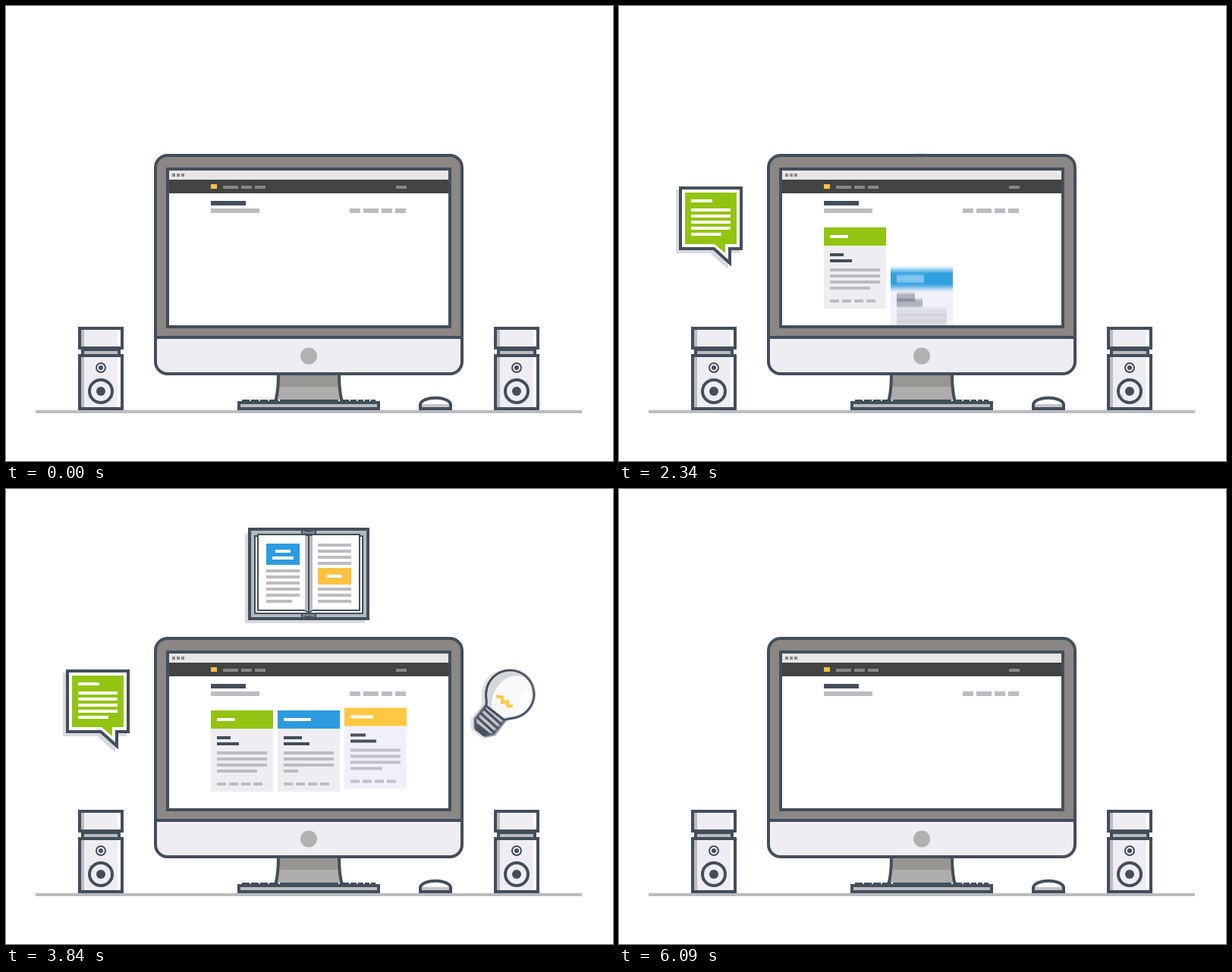
Recreate the animation shown at these times as an HTML page with a canvas. Size 800 px wide and 600 px high, loop 6.3 s.

```html
<!DOCTYPE html>
<html>
<head>
<meta charset="utf-8">
<style>
html, body { margin: 0; width: 100%; height: 100%; overflow: hidden; background: #fff; }
canvas { display: block; }
</style>
</head>
<body>
<canvas id="stage" width="800" height="600"></canvas>
<script>
const LOOP = 6300, STEP = 30;
const DARK = '#434e5b', GREY = '#bbbcc1', IVORY = '#eeedf2', FRAME = '#8a8785', WHITE = '#fff',
      SHADOW = '#d9dae0', GREEN = '#93c412', BLUE = '#2d9bdf', YELLOW = '#ffc240';

const ctx = document.getElementById('stage').getContext('2d');

function makeCanvas(w, h) {
  const c = document.createElement('canvas');
  c.width = w;
  c.height = h;
  return c;
}

// Drawing helpers
function box(g, color, x, y, w, h) {
  g.fillStyle = color;
  g.fillRect(x, y, w, h);
}
function bars(g, color, x, ys, w, h = 4) {
  for (const y of ys) box(g, color, x, y, w, h);
}
function shape(g, path, fill, stroke, width = 4) {
  const p = new Path2D(path);
  if (fill) { g.fillStyle = fill; g.fill(p); }
  if (stroke) { g.strokeStyle = stroke; g.lineWidth = width; g.stroke(p); }
}
function disc(g, x, y, r, fill, stroke, width) {
  shape(g, `M${x - r} ${y}a${r} ${r} 0 1 1 ${2 * r} 0a${r} ${r} 0 1 1 ${-2 * r} 0Z`, fill, stroke, width);
}

function drawSpeaker(g, x) {
  const cabinet = (y, h) => {
    box(g, DARK, x, y, 60, h);
    box(g, GREY, x + 4, y + 4, 4, h - 8);
    box(g, IVORY, x + 8, y + 4, 44, h - 8);
    box(g, WHITE, x + 52, y + 4, 4, h - 8);
  };
  box(g, DARK, x + 4, 453, 52, 6);
  box(g, GREY, x + 8, 455, 44, 4);
  cabinet(423, 30);
  cabinet(459, 74);
  disc(g, x + 30, 477, 6, IVORY, DARK, 2);
  disc(g, x + 30, 477, 3, DARK);
  disc(g, x + 30, 508, 15, IVORY, DARK, 4);
  disc(g, x + 30, 508, 6, DARK);
}

function drawDesk(g) {
  box(g, GREY, 39, 533, 720, 4);
  drawSpeaker(g, 95);
  drawSpeaker(g, 643);

  // Stand
  const stand = 'M359 485C359 503 358 512 355 522H443C440 512 439 503 439 485Z';
  shape(g, stand, '#adadad');
  box(g, '#979692', 359, 487, 80, 15);
  shape(g, stand, null, DARK);

  // Keyboard
  box(g, DARK, 305, 521, 188, 12);
  box(g, GREY, 309, 525, 180, 4);
  box(g, DARK, 311, 519, 176, 2);
  for (const x of [321, 333, 345, 359, 438, 452, 462, 471, 479]) box(g, WHITE, x, 519, 2, 2);

  // Mouse
  const mouse = 'M546 531V525C549 514 583 514 586 525V531Z';
  shape(g, mouse, WHITE);
  box(g, '#c6c6ca', 548, 525, 36, 4);
  shape(g, mouse, null, DARK);

  // Monitor
  const body = 'M213 197H585A16 16 0 0 1 601 213V469A16 16 0 0 1 585 485H213A16 16 0 0 1 197 469V213A16 16 0 0 1 213 197Z';
  shape(g, body, FRAME);
  g.save();
  g.clip(new Path2D(body));
  box(g, IVORY, 195, 437, 408, 50);
  g.restore();
  box(g, DARK, 197, 435, 404, 4);
  shape(g, body, null, DARK);
  disc(g, 399, 461.5, 11, '#b1b1b1');

  // Web page
  box(g, DARK, 211, 213, 376, 212);
  box(g, WHITE, 215, 217, 368, 204);
  box(g, '#e7e7e7', 215, 217, 368, 12);
  for (const x of [219, 225, 231]) box(g, FRAME, x, 221, 4, 4);
  box(g, '#434343', 215, 229, 368, 18);
  box(g, YELLOW, 270, 235, 8, 6);
  for (const [x, w] of [[286, 20], [310, 14], [328, 14], [514, 14]]) box(g, FRAME, x, 237, w, 4);
  box(g, DARK, 270, 257, 46, 6);
  for (const [x, w] of [[270, 64], [453, 14], [471, 20], [495, 14], [513, 14]]) box(g, GREY, x, 267, w, 6);
}

function drawBubble(g) {
  const outline = 'M81 240H161V320H146V339L125 320H81Z';
  g.save();
  g.translate(-4, 4);
  shape(g, outline, SHADOW, SHADOW);
  g.restore();
  shape(g, outline, WHITE, DARK);
  shape(g, 'M87 246H155V314H140V326L126 314H87Z', GREEN);
  box(g, WHITE, 95, 255, 28, 4);
  bars(g, WHITE, 95, [267, 275, 283, 291], 52);
  box(g, WHITE, 95, 299, 40, 4);
}

function drawBook(g) {
  box(g, SHADOW, 315, 59, 158, 118);
  box(g, DARK, 319, 51, 160, 122);
  box(g, '#b3b9c0', 323, 55, 152, 114);
  shape(g, 'M328 62H470V164H328Z', WHITE, DARK, 2);
  shape(g, 'M390 53Q399 58 408 53V60H390Z', '#7d848c', DARK, 2);
  shape(g, 'M390 171Q399 166 408 171V164H390Z', '#7d848c', DARK, 2);
  shape(g, 'M388 51H410Q399 58 388 51ZM388 173H410Q399 166 388 173Z', DARK);
  shape(g, 'M332 60H394L399 63L404 60H466V160H404L399 163L394 160H332Z', WHITE, DARK, 2);
  box(g, GREY, 394, 62, 10, 98);
  box(g, DARK, 398, 62, 2, 101);

  box(g, BLUE, 343, 72, 44, 28);
  box(g, WHITE, 355, 80, 20, 4);
  box(g, WHITE, 351, 89, 28, 4);
  bars(g, GREY, 343, [106, 114, 122, 130, 138], 44);
  box(g, GREY, 343, 146, 34, 4);
  bars(g, GREY, 411, [72, 80, 88, 96, 130, 138, 146], 44);
  box(g, YELLOW, 411, 104, 44, 22);
  box(g, WHITE, 423, 113, 20, 4);
}

function drawBulb(g) {
  const glass = 'M650 309C650 302 630 294 630 269A40 40 0 0 1 710 269C710 294 690 302 690 309Z';
  const base = 'M650 309H690V338L680 350H660L650 338Z';
  g.save();
  g.translate(-4, 4);
  shape(g, glass + base, SHADOW, SHADOW);
  g.restore();
  shape(g, glass, '#f1f1f4');
  shape(g, 'M654 307C650 300 633 292 633 269A37 37 0 0 1 670 232C640 243 638 284 661 307Z', '#d0d1d6');
  g.fillStyle = WHITE;
  g.beginPath();
  g.ellipse(691, 257, 7, 13, -0.4, 0, 7);
  g.fill();
  shape(g, 'M654 286L663 281L668 288L674 281L679 287L686 282', null, YELLOW, 5);
  shape(g, glass, null, DARK);
  shape(g, base, GREY, DARK);
  for (const y of [315, 324, 333]) shape(g, `M648 ${y}L692 ${y + 3}`, null, DARK, 4);
  shape(g, 'M656 341H684L678 350H662Z', DARK);
}

function drawCard(g, color, head, title, subtitle, lastLine) {
  box(g, color, 0, 0, 82, 24);
  box(g, IVORY, 0, 24, 82, 83);
  box(g, WHITE, 8, 10, head, 4);
  box(g, DARK, 8, 34, title, 4);
  box(g, DARK, 8, 42, subtitle, 4);
  bars(g, GREY, 8, [54, 62, 70], 66);
  box(g, GREY, 8, 78, lastLine, 4);
  for (const x of [8, 24, 40, 56]) box(g, GREY, x, 95, 12, 4);
}

// A sprite is pre-rendered at double size, with its pivot in the middle
function sprite(px, py, draw) {
  const c = makeCanvas(480, 480), g = c.getContext('2d');
  g.scale(2, 2);
  g.translate(120 - px, 120 - py);
  draw(g);
  return c;
}

// Easing
const clamp = u => Math.min(1, Math.max(0, u));
const sine = u => (1 - Math.cos(Math.PI * clamp(u))) / 2;
const quint = u => u < 0.5 ? 16 * u ** 5 : 1 - 16 * (1 - u) ** 5;
const backOut = (u, s = 0.9) => 1 + (s + 1) * (u - 1) ** 3 + s * (u - 1) ** 2;

// Poses are [x, y, degrees, scale]
function bubblePose(t) {
  const away = t < 4950 ? 1 - sine((t - 990) / 420) : sine((t - 4950) / 270);
  return [121 + 90 * away, 291, -180 * away, 1 - away];
}
function bookPose(t) {
  const away = t < 4890 ? 1 - sine((t - 2280) / 450) : sine((t - 4890) / 330);
  return [399, 112 + 90 * away, -180 * away, 1 - away];
}
function bulbPose(t) {
  if (t < 4230) {
    const away = (1 - clamp((t - 3540) / 630)) ** 2.4;
    return [670 - 75 * away, 290 - 30 * away, 180 * away, 1 - away];
  }
  const away = clamp((t - 4230) / 750) ** 7;
  return [670 - 114 * away, 290 - 8 * away, -165 * away, 1 - 0.4 * away];
}
function cardPose(i) {
  const enter = 990 + 1275 * i + (i ? 15 : 0) - (i > 1 ? 15 : 0), leave = 5550 + 60 * i;
  return t => {
    const v = t - leave;
    let dy;
    if (v <= 0) dy = 130 * (1 - backOut(clamp((t - enter + 20) / 430)));
    else if (v < 150) dy = 19 * quint(v / 150);
    else dy = 19 - 145 * clamp((v - 150) / 270) ** 2;
    return [270 + 88 * i, 292 + dy, 0, 1];
  };
}

const flyers = [
  [sprite(121, 291, drawBubble), bubblePose],
  [sprite(399, 112, drawBook), bookPose],
  [sprite(670, 290, drawBulb), bulbPose]
];
const cards = [
  [GREEN, 24, 18, 29, 53],
  [BLUE, 36, 24, 34, 19],
  [YELLOW, 30, 20, 34, 42]
].map((spec, i) => [sprite(0, 0, g => drawCard(g, ...spec)), cardPose(i)]);

const desk = makeCanvas(800, 600);
drawDesk(desk.getContext('2d'));
const layer = makeCanvas(800, 600), blur = layer.getContext('2d');

function stamp(g, image, [x, y, degrees, scale]) {
  if (scale < 0.01) return;
  g.save();
  g.translate(x, y);
  g.rotate(degrees * Math.PI / 180);
  g.scale(scale, scale);
  g.drawImage(image, -120, -120, 240, 240);
  g.restore();
}

// Averages several poses around t when the sprite is moving
function drawMoving([image, pose], t) {
  const samples = 8, shutter = 15, a = pose(t - shutter / 2), b = pose(t + shutter / 2);
  if (a.every((v, i) => Math.abs(v - b[i]) < 0.02)) return stamp(ctx, image, pose(t));
  blur.clearRect(0, 0, 800, 600);
  blur.globalCompositeOperation = 'lighter';
  blur.globalAlpha = 1 / samples;
  for (let k = 0; k < samples; k++) stamp(blur, image, pose(t + shutter * ((k + 0.5) / samples - 0.5)));
  ctx.drawImage(layer, 0, 0);
}

function frame() {
  const t = Math.floor(performance.now() % LOOP / STEP) * STEP;
  box(ctx, WHITE, 0, 0, 800, 600);
  for (const f of flyers) drawMoving(f, t);
  ctx.drawImage(desk, 0, 0);
  ctx.save();
  ctx.beginPath();
  ctx.rect(270, 283, 258, 138);
  ctx.clip();
  for (const c of cards) drawMoving(c, t);
  ctx.restore();
  requestAnimationFrame(frame);
}
frame();
</script>
</body>
</html>
```
